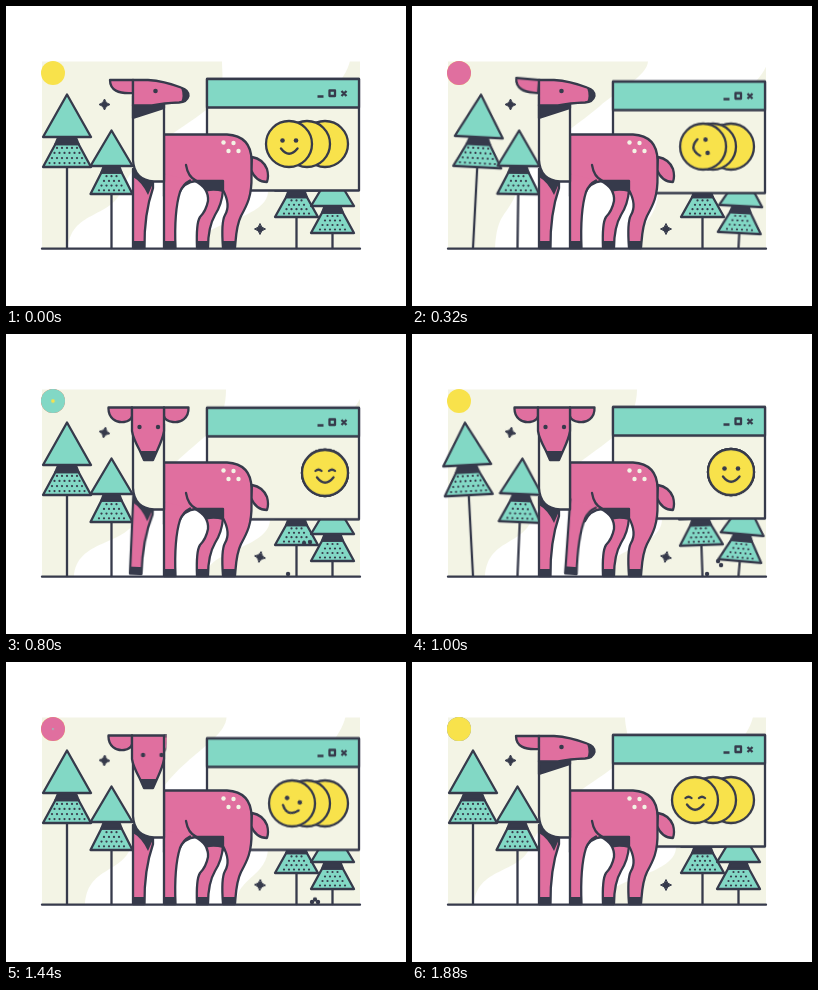
Write an HTML page that moves like this. It is 400 by 300 pixels and loops after 1.92 s.

```html
<!DOCTYPE html>
<html lang="en">
<head>
<meta charset="utf-8">
<title>Deer in the woods</title>
<style>
html, body { margin: 0; width: 100%; height: 100%; overflow: hidden; background: #fff; }
svg { display: block; width: 100%; height: 100%; }
.l { stroke: #363a4b; stroke-width: 2.3; stroke-linejoin: round; stroke-linecap: round; fill: none; }
.pink { fill: #e06f9f; }
.teal { fill: #82d8c5; }
.sun { fill: #f8e24b; }
.cream { fill: #f3f4e5; }
.dark { fill: #363a4b; }

.grow { transform-origin: 47px 67px; animation: 960ms linear infinite; }
.g1 { animation-name: g1; }
.g2 { animation-name: g2; }
.g3 { animation-name: g3; }
@keyframes g1 { 0%, 15.6% { transform: scale(0) } 31.2%, 100% { transform: none } }
@keyframes g2 { 0%, 49% { transform: scale(0) } 64.6%, 100% { transform: none } }
@keyframes g3 { 0%, 81.2% { transform: scale(0) } 95.8%, 100% { transform: none } }

.sway { animation: sway 1920ms ease-in-out infinite; }
@keyframes sway {
  0%, 6.25% { transform: none }
  16.67% { transform: rotate(var(--a)) }
  29%, 41.67% { transform: none }
  52.08% { transform: rotate(var(--b)) }
  64%, 100% { transform: none }
}

.bob { animation: bob 480ms cubic-bezier(.37,0,.63,1) infinite alternate; }
@keyframes bob { to { transform: translateY(3.4px) } }

/* the coins gather to the right, then spread out again */
.front { animation: front 1920ms infinite; }
.middle { animation: middle 1920ms infinite; }
.face { animation: roll 1920ms infinite; transform-origin: 283px 138px; }
@keyframes front {
  0% { transform: none }
  8.333% { transform: none; animation-timing-function: cubic-bezier(.333,0,.667,.333) }
  20.833% { transform: translateX(18px); animation-timing-function: cubic-bezier(.333,.667,.667,1) }
  33.333% { transform: translateX(36px) }
  55.208% { transform: translateX(36px); animation-timing-function: cubic-bezier(.333,0,.667,.333) }
  67.708% { transform: translateX(18px); animation-timing-function: cubic-bezier(.333,.667,.667,1) }
  80.208%, 100% { transform: none }
}
@keyframes middle {
  0% { transform: none }
  20.833% { transform: none; animation-timing-function: cubic-bezier(.333,.667,.667,1) }
  33.333% { transform: translateX(18px) }
  55.208% { transform: translateX(18px); animation-timing-function: cubic-bezier(.333,0,.667,.333) }
  67.708%, 100% { transform: none }
}
@keyframes roll {
  0% { transform: rotate(0deg) }
  8.333% { transform: rotate(0deg); animation-timing-function: cubic-bezier(.333,0,.667,.333) }
  20.833% { transform: rotate(180deg); animation-timing-function: cubic-bezier(.333,.667,.667,1) }
  33.333% { transform: rotate(360deg) }
  54.167% { transform: rotate(360deg); animation-timing-function: cubic-bezier(.333,0,.667,.333) }
  66.667% { transform: rotate(180deg); animation-timing-function: cubic-bezier(.333,.667,.667,1) }
  79.167%, 100% { transform: rotate(0deg) }
}
.open { animation: open 960ms step-end infinite; }
.shut { animation: shut 960ms step-end infinite; }
@keyframes open { 0% { opacity: 1 } 79% { opacity: 0 } 98% { opacity: 1 } }
@keyframes shut { 0% { opacity: 0 } 79% { opacity: 1 } 98% { opacity: 0 } }

/* head turn: the muzzle folds in, then the front view opens */
.side { animation: side 1920ms step-end infinite; }
.facing { animation: facing 1920ms step-end infinite; }
.muzzle { transform-origin: 140px 85px; animation: muzzle 1920ms ease-in infinite; }
.ear { transform-origin: 158px 80px; animation: ear 1920ms ease-out infinite; }
.look { animation: look 1920ms ease-out infinite; }
.flick { transform-origin: 127px 77px; animation: flick 1920ms ease-in-out infinite; }
@keyframes side { 0% { opacity: 1 } 25% { opacity: 0 } 77% { opacity: 1 } }
@keyframes facing { 0% { opacity: 0 } 25% { opacity: 1 } 77% { opacity: 0 } }
@keyframes muzzle { 0%, 16.7% { transform: none } 25%, 77% { transform: scaleX(.42) } 83%, 100% { transform: none } }
@keyframes ear { 0%, 25% { transform: scaleX(0) } 32%, 70% { transform: none } 77%, 100% { transform: scaleX(0) } }
@keyframes look { 0%, 25% { transform: translateX(4px) } 32%, 70% { transform: none } 77%, 100% { transform: translateX(4px) } }
@keyframes flick { 0%, 8% { transform: none } 16.7%, 25% { transform: rotate(5deg) } 77%, 83.3% { transform: rotate(-3deg) } 92%, 100% { transform: none } }

.far { transform-origin: 135px 172px; animation: far 1920ms ease-in-out infinite; }
.near { transform-origin: 165px 172px; animation: near 1920ms ease-in-out infinite; }
@keyframes far { 0%, 34% { transform: none } 41.7% { transform: translateY(-2px) rotate(2.5deg) } 49%, 100% { transform: none } }
@keyframes near { 0%, 45% { transform: none } 52.1% { transform: translateY(-2px) rotate(4deg) } 60%, 100% { transform: none } }

.star { animation: tilt 1920ms ease-in-out infinite; }
@keyframes tilt { 0%, 20% { transform: none } 41%, 54% { transform: rotate(13deg) } 68% { transform: rotate(8deg) } 82%, 100% { transform: none } }

.seed { animation: 1920ms linear infinite; }
.s1 { animation-name: s1; }
.s2 { animation-name: s2; }
.s3 { animation-name: s3; }
@keyframes s1 {
  0%, 33% { transform: translate(280px,207px) scale(0) }
  34% { transform: translate(280px,208px) }
  41.67% { transform: translate(282px,240px) }
  52.08% { transform: translate(295px,240px) }
  64%, 88% { transform: translate(306px,240px) }
  93%, 100% { transform: translate(306px,240px) scale(0) }
}
@keyframes s2 {
  0%, 40% { transform: translate(298px,208px) scale(0) }
  41.67% { transform: translate(298px,209px) }
  52.08% { transform: translate(306px,227px) }
  60% { transform: translate(309px,240px) }
  67% { transform: translate(308px,237.5px) }
  75%, 88% { transform: translate(309px,237.5px) }
  93%, 100% { transform: translate(309px,240px) scale(0) }
}
@keyframes s3 {
  0%, 40% { transform: translate(304px,207px) scale(0) }
  41.67% { transform: translate(304px,208px) }
  52.08% { transform: translate(309px,231px) }
  58%, 88% { transform: translate(312px,240px) }
  93%, 100% { transform: translate(312px,240px) scale(0) }
}
</style>
</head>
<body>
<svg viewBox="0 0 400 300">
  <clipPath id="scene"><rect x="36" y="55" width="318" height="188"/></clipPath>
  <rect class="cream" x="36" y="55.5" width="318" height="187"/>
  <path id="band" fill="#fff" clip-path="url(#scene)"/>

  <g>
    <circle class="sun" cx="47" cy="67" r="12"/>
    <circle class="grow g1 pink" cx="47" cy="67" r="12"/>
    <circle class="grow g2 teal" cx="47" cy="67" r="12"/>
    <circle class="grow g3 sun" cx="47" cy="67" r="12"/>
  </g>

  <g id="trees"></g>

  <g class="bob">
    <rect class="l cream" x="201" y="73" width="152" height="111.5"/>
    <rect class="l teal" x="201" y="73" width="152" height="28.5"/>
    <path class="l" style="stroke-linecap:butt" d="M311.500 90.500H317.500M323.500 84.500h5.500v5.500h-5.500zM335.500 85l5 5m0-5l-5 5"/>
    <circle class="l sun" cx="319" cy="138" r="23"/>
    <circle class="middle l sun" cx="301" cy="138" r="23"/>
    <g class="front">
      <circle class="l sun" cx="283" cy="138" r="23"/>
      <g class="face">
        <path class="l" d="M275 142.500Q283 153 291.500 142.500"/>
        <g class="open dark"><circle cx="276.500" cy="134.500" r="2.300"/><circle cx="290" cy="134.500" r="2.300"/></g>
        <path class="shut l" d="M273.500 136q3-2.600 6 0M287 136q3-2.600 6 0"/>
      </g>
    </g>
  </g>

  <g class="dark">
    <circle class="seed s1" r="2.200"/>
    <circle class="seed s2" r="2.200"/>
    <circle class="seed s3" r="2.200"/>
  </g>

  <g id="stars"></g>

  <g id="deer">
    <g class="far">
      <path class="l pink" d="M127 163V242H138.500Q138 208 147 182V172z"/>
      <path class="dark" d="M127 164L148 175L142 189Q136 176 127 171z"/>
      <path class="dark" d="M127 235H138.500V242H127z"/>
    </g>
    <path class="l pink" d="M189 175Q203 182 202 195Q200 205 194 211Q190 217 191 242H202Q202 221 209 209Q216 198 217 184V174z"/>
    <path class="dark" d="M190.500 235H202V242H190.500z"/>
    <path class="l pink" d="M246 151Q257 153 261 163Q263 170 261 176Q250 176 245 164z"/>
    <path class="l pink" d="M158 128.500H221Q245 130 245.500 154V170C246 190 241 199 235 210C230 220 230 230 229 242H217Q215 216 219 209Q225 199 217 184V175H190Q178 176 173 187L158 190z"/>
    <path class="dark" d="M186 174.500H217V186Q208 184 201 185.500Q197 178 186 174.500z"/>
    <path class="dark" d="M216.500 235H229V242H216.500z"/>
    <g class="near">
      <path class="pink" d="M158 168V242H169.500Q168 205 174 186Q177 178 184 174z"/>
      <path class="l" d="M158 168V242H169.500Q168 205 174 186Q177 178 184 174.500"/>
      <path class="dark" d="M158 235H169.500V242H158z"/>
    </g>
    <path class="l" d="M180 159Q182 171 190 174.500"/>
    <g class="cream">
      <circle cx="217.500" cy="136.500" r="2.200"/><circle cx="227.500" cy="137" r="2.200"/>
      <circle cx="222.500" cy="145" r="2.200"/><circle cx="232.500" cy="145" r="2.200"/>
    </g>
    <path class="l cream" d="M127 90H158V175.500H148Q128 174 127 154z"/>

    <g class="side">
      <path class="flick l pink" d="M104 74H127V87C112 88 104 84 104 74z"/>
      <path class="l dark" d="M127 99H158V102L127 112z"/>
      <g class="muzzle">
        <path class="l pink" d="M127 74H142Q158 75 175 81.500Q183 84 182.500 90Q181 96 173 96.500Q158 97 146 99.500H127z"/>
        <path class="dark" d="M175 81.500Q184 84 182.500 90Q181 96 175 96.500Q178 90 175 81.500z"/>
        <circle class="dark" cx="149.500" cy="85" r="2.300"/>
      </g>
    </g>

    <g class="facing">
      <path class="l pink" d="M102.500 73.500C102 84 110 89 118 88Q125 87 126 82V73.500z"/>
      <path class="ear l pink" d="M182.500 73.500C183 84 175 89 167 88Q159 87 158 82V73.500z"/>
      <path class="l pink" d="M126 73.500H158V97Q157 104 151 117L147 126H138L134 117Q127 104 126 97z"/>
      <g class="look dark">
        <circle cx="133.500" cy="93" r="2.200"/><circle cx="152" cy="93" r="2.200"/>
      </g>
      <path class="dark" d="M134 117H151L147.500 126H137.500z"/>
    </g>
  </g>
  <path class="l" d="M36 242.700H354"/>
</svg>
<script>
const LOOP = 1920, STEP = 40;

// x: trunk, y: apex, w: half width, h: crown, cap: dark band, skirt: dotted part
// a, b: lean in degrees at the two gusts
function tree(x, y, w, h, cap, skirt, a, b) {
  const y1 = y + h, y2 = y1 + cap, y3 = y2 + skirt, neck = w * .48, gap = 5;
  let dots = '';
  for (let row = 0; row < 4; row++) {
    const dy = skirt * (.17 + row * .22);
    const half = neck + (w - neck) * dy / skirt - 2.5;
    const shift = row % 2 ? gap / 2 : 0;
    const n = Math.floor((half - shift) / gap);
    for (let dx = -shift - n * gap; dx <= half; dx += gap) {
      dots += `<circle cx="${x + dx}" cy="${y2 + dy}" r="1.1"/>`;
    }
  }
  return `<g class="sway" style="--a:${a}deg;--b:${b}deg;transform-origin:${x}px 242px">
    <path class="l" d="M${x} ${y3}V242"/>
    <path class="l teal" d="M${x - neck} ${y2}H${x + neck}L${x + w} ${y3}H${x - w}z"/>
    <g class="dark">${dots}</g>
    <path class="l dark" d="M${x - w * .36} ${y1}H${x + w * .36}L${x + neck} ${y2}H${x - neck}z"/>
    <path class="l teal" d="M${x} ${y}L${x + w} ${y1}H${x - w}z"/></g>`;
}

function star(x, y) {
  return `<path class="star dark" stroke="#363a4b" style="transform-origin:${x}px ${y}px"
    d="M${x} ${y - 5.5}q1 4.500 5.500 5.500q-4.500 1-5.500 5.500q-1-4.500-5.500-5.500q4.500-1 5.500-5.500z"/>`;
}

document.getElementById('trees').innerHTML =
  tree(61, 88.5, 24, 42.5, 7, 23, 3, -3) +
  tree(105.5, 124.5, 21, 35.5, 6.5, 21.5, .8, 2.4) +
  tree(290.5, 149, 21.5, 35.5, 6.5, 20, 0, -2) +
  tree(326.5, 164.5, 21.5, 35.5, 6.5, 20.5, 3, 5);
document.getElementById('stars').innerHTML = star(98.5, 98.5) + star(254, 223);

// time, left edge (top, upper, lower, bottom), right edge (top, lower, bottom)
const keys = [
  [0, 216, 205, 115, 62, 344, 262, 190],
  [320, 236, 188, 105, 83, 356, 246, 225],
  [800, 220, 202, 130, 68, 358, 264, 200],
  [1000, 225, 205, 120, 73, 362, 250, 190],
  [1280, 238, 172, 120, 88, 354, 256, 232],
  [1600, 203, 190, 130, 70, 325, 268, 228],
  [1880, 213, 208, 118, 62, 341, 264, 190]
];
keys.push([LOOP, ...keys[0].slice(1)]);
const band = document.getElementById('band');

function draw() {
  const t = Math.floor(performance.now() % LOOP / STEP) * STEP;
  const i = keys.findIndex(k => k[0] > t) - 1;
  const from = keys[i], to = keys[i + 1];
  const u = (t - from[0]) / (to[0] - from[0]);
  const e = u * u * (3 - 2 * u);
  const [, a, b, c, d, r, s, q] = from.map((v, n) => v + (to[n] - v) * e);
  band.setAttribute('d', `M${a} 55C${a} 70 ${b + 15} 86 ${b} 100C${b - 25} 122 ${c + 20} 140 ${c} 185
    C${c - 10} 212 ${d + 2} 205 ${d} 243H${q}C${q} 215 ${s} 215 ${s} 185C${s} 130 ${r - 10} 95 ${r} 55z`);
  requestAnimationFrame(draw);
}
draw();
</script>
</body>
</html>
```
